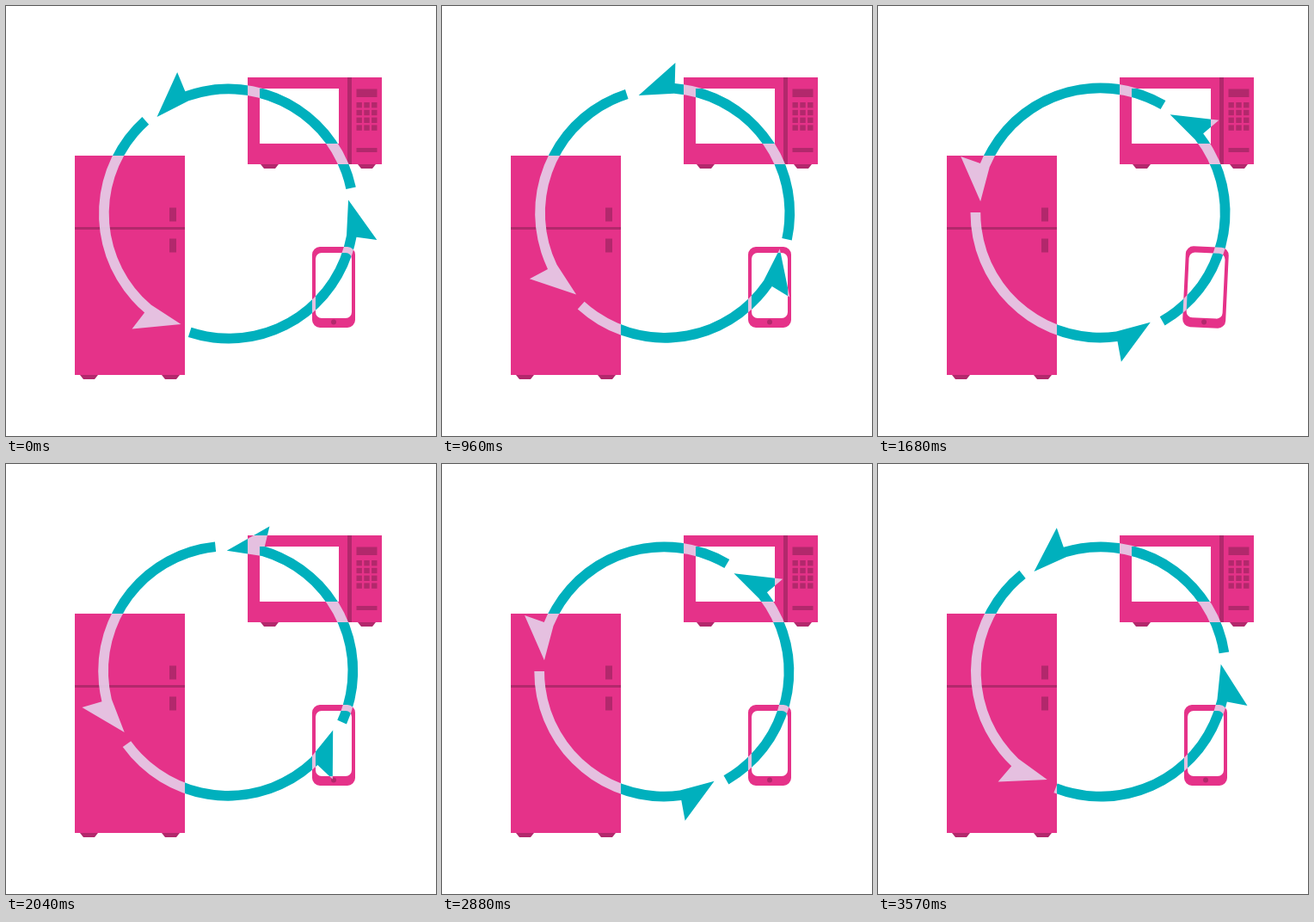
These frames come from a looping animation (500x500 px, 3.6 s). An HTML page with a canvas:

```html
<!DOCTYPE html>
<html>
<head>
<meta charset="utf-8">
<style>
  html, body { margin: 0; width: 100%; height: 100%; overflow: hidden; background: #fff; }
  canvas { display: block; }
</style>
</head>
<body>
<canvas width="500" height="500"></canvas>
<script>
const ctx = document.querySelector('canvas').getContext('2d');
const PINK = '#e53289', DARK = '#b2286c', TEAL = '#00b0bd', LIGHT = 'rgba(229,207,234,.9)';
const LOOP = 3600, STEP = 30, RAD = Math.PI / 180;

function rect(color, x, y, w, h) {
  ctx.fillStyle = color;
  ctx.fillRect(x, y, w, h);
}

function foot(x, y) {
  ctx.fillStyle = DARK;
  ctx.beginPath();
  ctx.moveTo(x, y);
  ctx.lineTo(x + 21, y);
  ctx.lineTo(x + 17, y + 5);
  ctx.lineTo(x + 4, y + 5);
  ctx.fill();
}

function fridge() {
  foot(86, 429);
  foot(181, 429);
  rect(PINK, 80, 174, 128, 255);
  rect(DARK, 80, 257, 128, 3);
  rect(DARK, 190, 234.5, 8, 16);
  rect(DARK, 190, 270.5, 8, 16);
}

function microwave() {
  foot(296, 184);
  foot(409, 184);
  ctx.fillStyle = PINK;
  ctx.beginPath();
  ctx.rect(281, 83, 156, 101);
  ctx.rect(295, 96, 92, 64);
  ctx.fill('evenodd');
  rect(DARK, 397, 83, 5, 101);
  rect(DARK, 407.5, 96.5, 24, 9.5);
  rect(DARK, 407.5, 165, 24, 5);
  for (let i = 0; i < 12; i++)
    rect(DARK, 407.5 + i % 3 * 8.8, 112 + Math.floor(i / 3) * 8.8, 6.4, 6.4);
}

function phone() {
  ctx.fillStyle = PINK;
  ctx.beginPath();
  ctx.roundRect(356, 280, 50, 94, 9);
  ctx.roundRect(360, 287, 42, 76, 7);
  ctx.fill('evenodd');
  ctx.fillStyle = DARK;
  ctx.beginPath();
  ctx.arc(381, 367.5, 3, 0, 7);
  ctx.fill();
}

// Each item tilts clockwise and back once, stretching slightly.
const items = [
  { draw: fridge, start: 540, x: 144, y: 301.5, tilt: 8, sx: .08, sy: 0 },
  { draw: microwave, start: 1080, x: 359, y: 133.5, tilt: 5.4, sx: 0, sy: .03 },
  { draw: phone, start: 1620, x: 381, y: 327, tilt: 5.4, sx: 0, sy: 0 }
];

function drawItem({ draw, start, x, y, tilt, sx, sy }, t) {
  const p = (t - start) / 360;
  const k = p > 0 && p < 1 ? Math.sin(Math.PI * p) : 0;
  ctx.save();
  ctx.translate(x, y);
  ctx.rotate(tilt * k * RAD);
  ctx.scale(1 + sx * k, 1 + sy * k);
  ctx.translate(-x, -y);
  draw();
  ctx.restore();
}

function polar(r, deg) {
  ctx.lineTo(r * Math.cos(deg * RAD), -r * Math.sin(deg * RAD));
}

function ring(t, color, mode) {
  ctx.save();
  ctx.globalCompositeOperation = mode;
  ctx.fillStyle = color;
  ctx.translate(258.7, 241);
  ctx.rotate(-t / LOOP * 2 * Math.PI);
  ctx.translate(.3, .5);
  ctx.beginPath();
  for (const tip of [6.6, 126.6, 246.6]) {
    const tail = tip - 114.8, neck = tip - 17;
    ctx.moveTo(151 * Math.cos(tail * RAD), -151 * Math.sin(tail * RAD));
    ctx.arc(0, 0, 151, -tail * RAD, -neck * RAD, true);
    polar(175, tip - 16.6);
    polar(140, tip);
    polar(139.3, neck);
    ctx.arc(0, 0, 139.3, -neck * RAD, -tail * RAD);
    ctx.closePath();
  }
  ctx.fill();
  ctx.restore();
}

function frame(now) {
  const t = Math.floor(now % LOOP / STEP) * STEP;
  ctx.clearRect(0, 0, 500, 500);
  items.forEach(item => drawItem(item, t));
  ring(t, LIGHT, 'source-atop');
  ring(t, TEAL, 'destination-over');
  requestAnimationFrame(frame);
}
requestAnimationFrame(frame);
</script>
</body>
</html>
```
